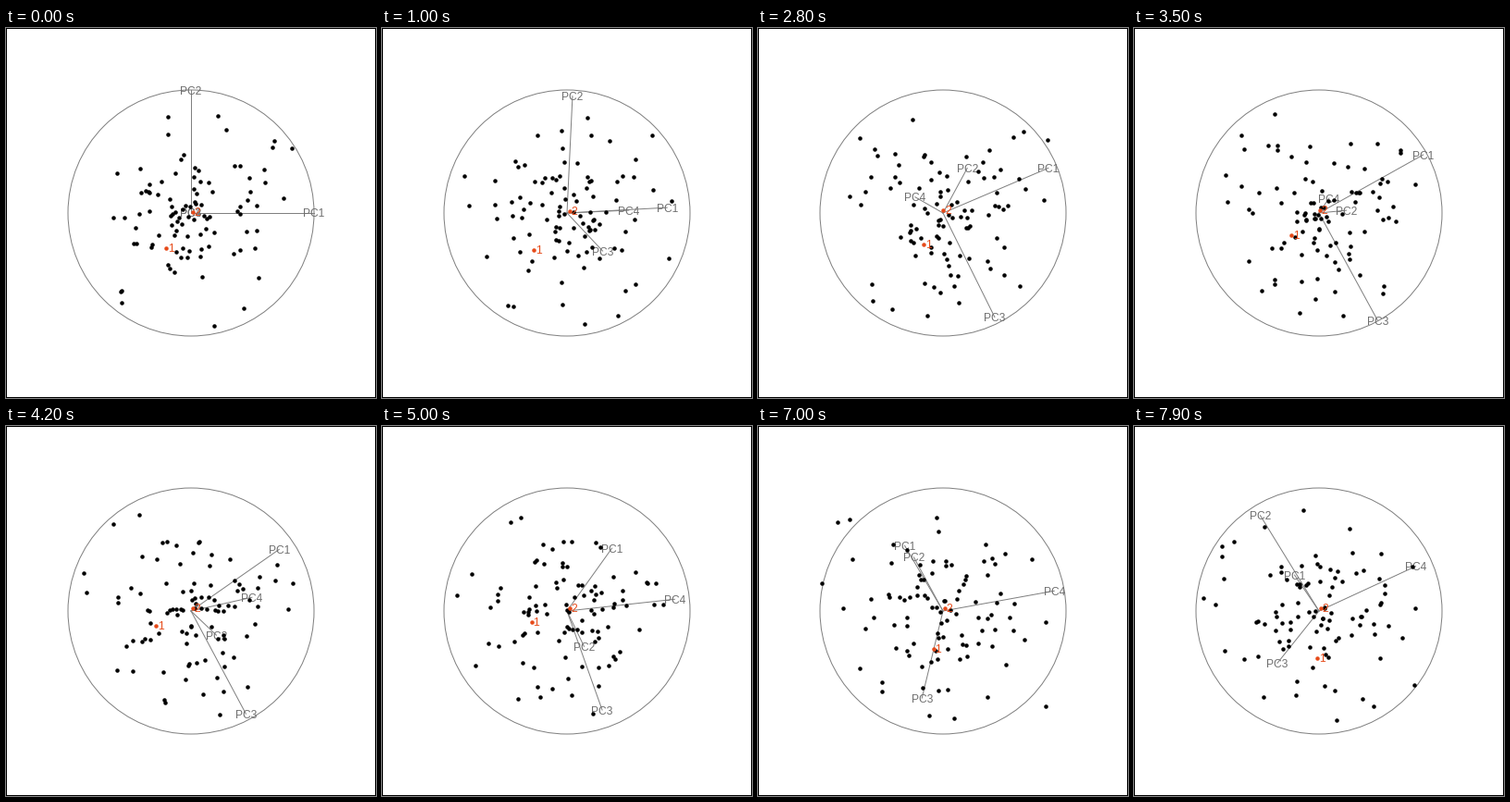
Write a matplotlib script that moves like this. It is 400 px wide and 400 px high and loops after 8000 ms.

```python
import numpy as np
import matplotlib.pyplot as plt
from matplotlib.animation import FuncAnimation
from matplotlib.patches import Circle, Rectangle

SIZE, MID, R = 400, 200, 133
FRAMES, STEP = 80, 100
COUNT, SPREAD, REACH = 100, 49, 138
LINE, GREY, RED = "#808080", "#6e6e6e", "#e64a19"
FONT = dict(family="Liberation Sans", size=12 * .72, ha="center", va="baseline")

# Key poses of the tour: time in ms, then the tips of PC1..PC4 in circle radii.
POSES = {
    0: [(1, 0), (0, 1), (0, 0), (0, 0)],
    1000: [(.81, .04), (.04, .95), (.29, -.31), (.5, .02)],
    2200: [(.86, .23), (.16, .64), (.38, -.73), (-.31, .12)],
    3500: [(.84, .47), (.22, .02), (.48, -.88), (.08, .12)],
    5000: [(.36, .51), (.14, -.29), (.29, -.81), (.87, .09)],
    6000: [(-.19, .57), (.04, -.02), (-.03, -.82), (.98, .08)],
    7900: [(-.2, .29), (-.48, .77), (-.34, -.42), (.79, .36)],
}
TIMES = np.array(list(POSES))
BASES = np.array(list(POSES.values()), float)
SLOPES = np.gradient(BASES, TIMES, axis=0)

MARKED = [(-27, -38, 8, -29), (2, 1, -2, 3)]
OUTLIERS = [(109, 70, -28, -76), (100, 16, 26, 47), (57, -103, 51, -4),
            (-76, -85, 49, -26), (-75, -84, 57, 86), (79, 47, 22, -101),
            (38, 90, -12, -74), (-36, 20, 109, 8)]


def basis(ms):
    """Hermite path through the poses, kept orthonormal."""
    i = min(np.searchsorted(TIMES, ms, side="right") - 1, len(TIMES) - 2)
    h = TIMES[i + 1] - TIMES[i]
    s = (ms - TIMES[i]) / h
    b = ((1 + 2 * s) * (1 - s) ** 2 * BASES[i]
         + s * (1 - s) ** 2 * h * SLOPES[i]
         + s * s * (3 - 2 * s) * BASES[i + 1]
         + s * s * (s - 1) * h * SLOPES[i + 1])
    u, _, vt = np.linalg.svd(b, full_matrices=False)
    return u @ vt


def cloud():
    """4-D scores, marked cases first; the rest is a bounded normal cloud."""
    rng = np.random.default_rng(7)
    rest = rng.normal(0, SPREAD, (COUNT - len(MARKED) - len(OUTLIERS), 4))
    norm = np.linalg.norm(rest, axis=1, keepdims=True)
    rest *= np.minimum(1, REACH / norm)
    return np.vstack([MARKED, OUTLIERS, rest - rest.mean(axis=0)])


DATA = cloud()

# A white sheet on black leaves a border one pixel wide.
fig = plt.figure(figsize=(4, 4), dpi=100, facecolor="black")
ax = fig.add_axes([0, 0, 1, 1], xlim=(0, SIZE), ylim=(0, SIZE))
ax.axis("off")
ax.add_patch(Rectangle((1, 1), SIZE - 2, SIZE - 2, fc="white", lw=0, zorder=0))
ax.add_patch(Circle((MID, MID), R, fill=False, ec=LINE, lw=.72))

spokes = [ax.plot([], [], color=LINE, lw=.72)[0] for _ in range(4)]
names = [ax.text(0, 0, f"PC{k + 1}", color=GREY, zorder=3, **FONT) for k in range(4)]
dot = dict(ls="", marker="o", ms=4.5 * .72, mew=0)
dots, = ax.plot([], [], color="black", zorder=4, **dot)
marks, = ax.plot([], [], color=RED, zorder=5, **dot)
tags = [ax.text(0, 0, str(k + 1), color=RED, zorder=5, **FONT) for k in range(2)]


def draw(n):
    b = basis(n * STEP)
    for (x, y), line, name in zip(MID + R * b, spokes, names):
        line.set_data([MID, x], [MID, y])
        name.set_position((x, y - 4.5))
    pts = MID + DATA @ b
    marks.set_data(*pts[:2].T)
    dots.set_data(*pts[2:].T)
    for (x, y), tag in zip(pts, tags):
        tag.set_position((x + 5, y - 4))
    return [*spokes, *names, dots, marks, *tags]


anim = FuncAnimation(fig, draw, frames=FRAMES, interval=STEP, repeat=True,
                     repeat_delay=0, blit=False)
plt.show()
```
